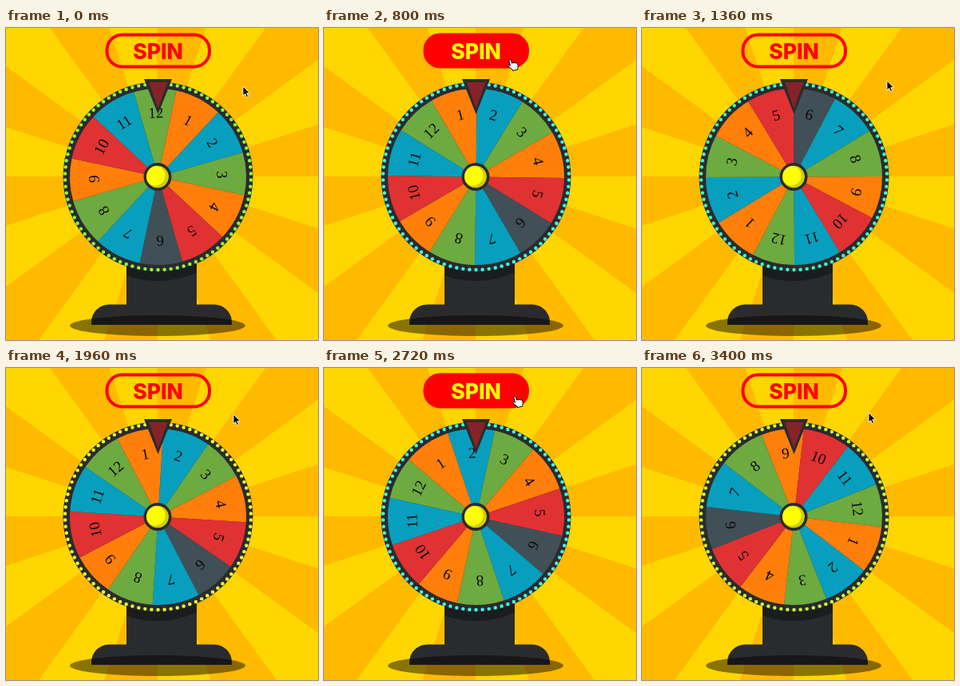
Animation of 391 by 391 pixels, one loop 3440 ms. Source, as an HTML page:

```html
<!DOCTYPE html>
<html lang="en">
<head>
<meta charset="utf-8">
<title>Prize wheel</title>
<style>
html, body { margin: 0; width: 100%; height: 100%; overflow: hidden; background: #ffd600; }
svg { display: block; width: 100%; height: 100%; }
.num { font: 19px "Liberation Serif", "Times New Roman", serif; text-anchor: middle; fill: #0b0b0b; }
.spin { font: 800 26.5px Inter, Roboto, sans-serif; text-anchor: middle; }
</style>
</head>
<body>
<svg viewBox="0 0 391 391">
  <defs>
    <clipPath id="column"><rect x="151" y="280" width="88" height="67"/></clipPath>
    <clipPath id="ball"><circle cx="190" cy="186.500" r="14"/></clipPath>
  </defs>
  <rect width="391" height="391" fill="#ffd600"/>
  <path id="rays" fill="#ffba00"/>

  <path d="M151 280H239V346.500H261A22 22 0 0 1 283 368.500V372H107V368.500A22 22 0 0 1 129 346.500H151Z" fill="#2a2b2d"/>
  <circle cx="190" cy="199" r="118" fill="#1b1c1d" clip-path="url(#column)"/>
  <ellipse cx="190" cy="373" rx="110" ry="13" fill="#000" fill-opacity=".46"/>

  <circle cx="190.500" cy="186.500" r="119" fill="#2a2b2d"/>
  <g id="bulbs"></g>
  <g id="wheel"></g>

  <circle cx="190" cy="186.500" r="17.500" fill="#2a2b2d"/>
  <g clip-path="url(#ball)">
    <circle cx="190" cy="186.500" r="14" fill="#cfcf08"/>
    <circle cx="187" cy="185" r="12.500" fill="#ffff00"/>
  </g>
  <path d="M173 64H208L190.500 108Z" fill="#2a2b2d"/>
  <path d="M179 68H202.500L190.500 101Z" fill="#862328"/>

  <rect id="pill" x="126.500" y="8.500" width="128.500" height="40" rx="19" stroke="#ff0000" stroke-width="4"/>
  <text id="label" class="spin" x="190.500" y="38.500">SPIN</text>

  <path id="arrow" d="M0 0V12L2.700 9.500L4.500 13.700L6.500 12.800L4.800 8.700H8.500Z" fill="#000" stroke="#fff" stroke-width=".9"/>
  <path id="hand" d="M-1.500 1.200Q-1.400 -.3 0 -.3T1.500 1.200V5.200Q3.500 4.200 4.300 5.600Q6.200 4.800 7 6.400Q9 6 9 8.200V10.500Q8.800 12 7.600 14V15.500H.2V14Q-2.500 11 -4.300 8.200Q-4.800 6.500 -3.200 6.500Q-2.200 6.800 -1.500 8Z" fill="#fff" stroke="#000" stroke-width="1"/>
</svg>
<script>
const LOOP = 3440, STEP = 40, CX = 190.5, CY = 186.5;
const $ = id => document.getElementById(id);

const ORANGE = '#ff7f0a', BLUE = '#079fbd', GREEN = '#6daa40', RED = '#e03232', SLATE = '#414f57';
const SLICES = [GREEN, ORANGE, BLUE, GREEN, ORANGE, RED, SLATE, BLUE, GREEN, ORANGE, RED, BLUE];
// Slice starts within each quarter turn
const EDGES = [-14, 14, 45];

// Each key is [time, value, ...]
const CURSOR = [[0, 297, 73], [80, 294, 70], [390, 233, 40], [920, 233, 40], [1200, 307, 66],
  [1400, 307, 66], [1840, 285, 58], [1980, 285, 58], [2260, 239, 36], [2880, 239, 36],
  [3160, 284, 56], [LOOP, 284, 56]];
const HUE = [[0, 95], [440, 132], [800, 174], [1050, 180], [1360, 165], [1960, 67],
  [2060, 60], [2720, 174], [2860, 180], [3400, 76], [LOOP, 70]];
const HOVER = [[0, 0], [400, 0], [540, 1], [980, 1], [1120, 0], [2190, 0], [2330, 1], [2960, 1], [3100, 0], [LOOP, 0]];
const SPINS = [{ start: 505, turn: 1040.5 }, { start: 2379, turn: 894 }];
const SPIN_TIME = 1443, REST = -2;

const lerp = (a, b, p) => a + (b - a) * p;
const clamp = p => Math.min(1, Math.max(0, p));
const smooth = p => p * p * (3 - 2 * p);
const edge = i => EDGES[i % 3] + 90 * Math.floor(i / 3);

function track(keys, t, curve = p => p) {
  let i = 1;
  while (i < keys.length - 1 && t > keys[i][0]) i++;
  const a = keys[i - 1], b = keys[i];
  const p = curve(clamp((t - a[0]) / (b[0] - a[0])));
  return a.slice(1).map((v, k) => lerp(v, b[k + 1], p));
}

// Cubic curve with handles (.25, .1) and (.25, 1)
function ease(x) {
  let lo = 0, hi = 1;
  for (let i = 0; i < 24; i++) {
    const u = (lo + hi) / 2;
    if (0.75 * u * (1 - u) + u ** 3 < x) lo = u; else hi = u;
  }
  const u = (lo + hi) / 2, v = 1 - u;
  return 0.3 * u * v * v + 3 * u * u * v + u ** 3;
}

function add(parent, name, attrs, text = '') {
  const el = document.createElementNS('http://www.w3.org/2000/svg', name);
  for (const key in attrs) el.setAttribute(key, attrs[key]);
  el.textContent = text;
  parent.append(el);
}

// Degrees run clockwise from the top
function polar(cx, cy, r, deg) {
  const a = (deg - 90) * Math.PI / 180;
  return [cx + r * Math.cos(a), cy + r * Math.sin(a)];
}

function build() {
  let rays = '';
  for (let deg = 0; deg < 360; deg += 36) {
    rays += `M190 186L${polar(190, 186, 420, deg)}L${polar(190, 186, 420, deg + 18)}Z`;
  }
  $('rays').setAttribute('d', rays);

  for (let deg = 0; deg < 360; deg += 4) {
    const [cx, cy] = polar(CX, CY, 116.5, deg);
    add($('bulbs'), 'circle', { cx, cy, r: 2.2 });
  }

  SLICES.forEach((fill, i) => {
    const d = `M0 0L${polar(0, 0, 110.5, edge(i))}A110.5 110.5 0 0 1 ${polar(0, 0, 110.5, edge(i + 1))}Z`;
    add($('wheel'), 'path', { d, fill });
  });
  SLICES.forEach((_, i) => {
    add($('wheel'), 'text', { class: 'num', y: -74, transform: `rotate(${i * 30})` }, i || 12);
  });
}

function draw(t) {
  const angle = SPINS.reduce((sum, s) => sum + s.turn * ease(clamp((t - s.start) / SPIN_TIME)), REST);
  $('wheel').setAttribute('transform', `translate(${CX} ${CY}) rotate(${angle})`);

  $('bulbs').setAttribute('fill', `hsl(${track(HUE, t)[0]} 100% 62%)`);

  const [hover] = track(HOVER, t, smooth);
  $('pill').setAttribute('fill', `rgba(255,0,0,${hover})`);
  $('label').setAttribute('fill', `rgb(255,${255 * hover},0)`);

  const [x, y] = track(CURSOR, t, smooth);
  const over = x < 257 && y < 50;
  $('arrow').setAttribute('transform', `translate(${x} ${y})`);
  $('hand').setAttribute('transform', `translate(${x} ${y}) rotate(-14) scale(.9)`);
  $('arrow').setAttribute('visibility', over ? 'hidden' : 'visible');
  $('hand').setAttribute('visibility', over ? 'visible' : 'hidden');
}

build();
const began = performance.now();
function tick() {
  const t = (performance.now() - began) % LOOP;
  draw(Math.floor(t / STEP) * STEP);
  requestAnimationFrame(tick);
}
tick();
</script>
</body>
</html>
```
